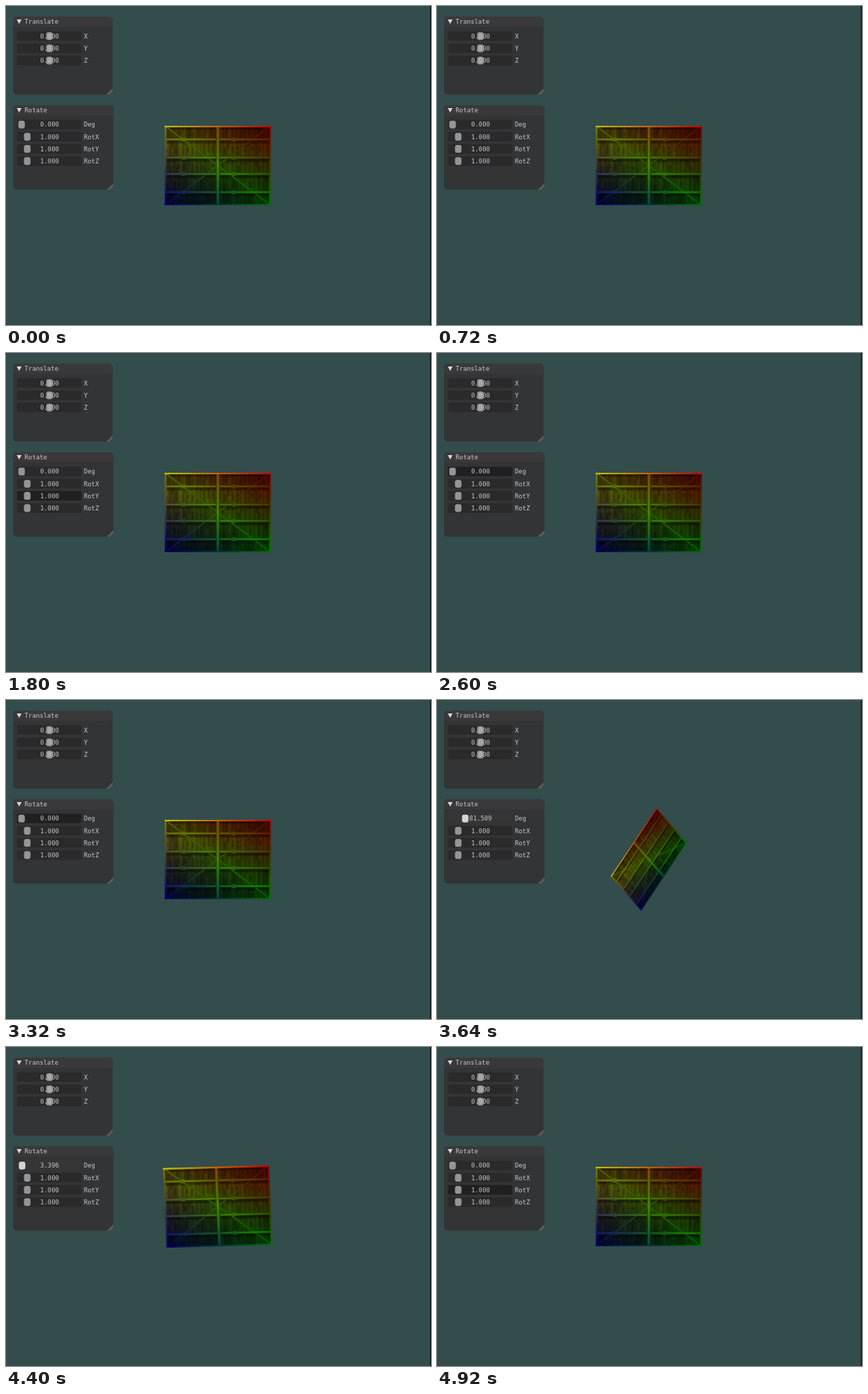
An HTML page with a canvas that plays this animation: 600 by 450 pixels, repeating every 5000 ms.

```html
<!DOCTYPE html>
<html lang="en">
<head>
<meta charset="utf-8">
<title>Translate and rotate</title>
<style>
  html, body { margin: 0; width: 100%; height: 100%; overflow: hidden; background: #334c4c; }
  canvas { display: block; }
</style>
</head>
<body>
<canvas id="stage" width="600" height="450"></canvas>
<script>
const ctx = document.getElementById('stage').getContext('2d');
const LOOP = 5000, TICK = 40;
const DEG_PER_STEP = 360 / 106;

// Slider drag: [time, slider steps]
const DRAG = [
  [3520, 0], [3560, 6], [3600, 15], [3640, 24], [3720, 37], [3800, 42],
  [3880, 36], [3960, 22], [4080, 7], [4200, 4], [4360, 1], [4440, 0]
];

function stepsAt(t) {
  const i = DRAG.findIndex(([time]) => time > t);
  if (i < 1) return 0;
  const [t0, n0] = DRAG[i - 1], [t1, n1] = DRAG[i];
  return Math.round(n0 + (n1 - n0) * (t - t0) / (t1 - t0));
}

const within = (t, from, to) => t >= from && t < to;

function seededRandom(seed) {
  return () => {
    seed = (seed * 16807) % 2147483647;
    return seed / 2147483647;
  };
}

// A square wooden crate face, tinted by its corner colours.
function makeCrate(size) {
  const canvas = document.createElement('canvas');
  canvas.width = canvas.height = size;
  const g = canvas.getContext('2d');
  const random = seededRandom(417);
  const gray = (v, a = 1) => `rgba(${v},${v},${v},${a})`;
  const wood = (v, a = 1) => `rgba(${v},${v * 0.86},${v * 0.62},${a})`;
  const box = (x, y, w, h, color) => {
    g.fillStyle = color;
    g.fillRect(x * size, y * size, w * size, h * size);
  };
  const line = (x0, y0, x1, y1, width, color) => {
    g.strokeStyle = color;
    g.lineWidth = width * size;
    g.beginPath();
    g.moveTo(x0 * size, y0 * size);
    g.lineTo(x1 * size, y1 * size);
    g.stroke();
  };

  // Planks with soft grain, darkening towards the foot
  const beams = [0.174, 0.402, 0.607, 0.835];
  const edges = [0, ...beams, 1];
  const rowLight = [78, 104, 88, 76, 70];
  g.filter = 'blur(1.6px)';
  rowLight.forEach((light, row) => {
    const top = edges[row], height = edges[row + 1] - top;
    box(0, top, 1, height, wood(light));
    for (let x = 0; x < 1; x += 0.042) {
      box(x, top, 0.042, height, wood(light - 14 + Math.floor(random() * 28)));
      box(x, top, 0.008, height, wood(25, 0.45));
      const y = random() * 0.6;
      box(x + random() * 0.03, top + y * height, 0.014, height * (1 - y) * random(), wood(25, 0.5));
    }
    box(0, top, 1, 0.05, gray(10, 0.45));
  });

  // Braces, beams and bolts
  g.filter = 'blur(1px)';
  for (const [y0, y1] of [[0, 1], [1, 0]]) {
    line(0, y0, 1, y1, 0.028, gray(50, 0.5));
    line(0, y0, 1, y1, 0.015, gray(108, 0.85));
  }
  for (const y of beams) {
    box(0, y - 0.016, 1, 0.038, gray(45, 0.8));
    box(0, y - 0.012, 1, 0.022, gray(136));
    for (const x of [0.18, 0.65]) box(x - 0.018, y - 0.024, 0.036, 0.048, gray(110));
  }
  box(0.484, 0, 0.034, 1, gray(45, 0.8));
  box(0.489, 0, 0.023, 1, gray(138));

  // Rim, with studs along the top and bottom
  g.filter = 'none';
  g.strokeStyle = gray(118);
  g.lineWidth = size * 0.034;
  g.strokeRect(0, 0, size, size);
  box(0, 0, 1, 0.022, gray(185));
  for (let x = 0; x < 1; x += 2 / 75) {
    box(x, 0, 0.0133, 0.01, gray(225));
    box(x, 0.99, 0.0133, 0.01, gray(85));
  }

  // Red rises with height; the diagonal runs blue, green, black.
  const tint = document.createElement('canvas');
  tint.width = tint.height = size;
  const c = tint.getContext('2d');
  const wash = (x1, y1, stops) => {
    const gradient = c.createLinearGradient(0, size, x1, y1);
    stops.forEach((color, i) => gradient.addColorStop(i / (stops.length - 1), color));
    c.fillStyle = gradient;
    c.fillRect(0, 0, size, size);
  };
  wash(0, 0, ['#000', '#f00']);
  c.globalCompositeOperation = 'lighter';
  wash(size, 0, ['#00f', '#0f0', '#000']);

  g.globalCompositeOperation = 'multiply';
  g.drawImage(tint, 0, 0);
  return canvas;
}

const crate = makeCrate(300);

// Orthographic view of a turn about the axis (1, 1, 1).
function drawCrate(degrees) {
  const angle = degrees * Math.PI / 180;
  const cos = Math.cos(angle), turn = Math.sin(angle) / Math.sqrt(3);
  const cross = (1 - cos) / 3, diag = cos + cross;
  const halfW = 75, halfH = 56.3;
  ctx.save();
  ctx.transform(halfW * diag, -halfH * (cross + turn), -halfW * (cross - turn), halfH * diag, 299, 225);
  ctx.imageSmoothingQuality = 'high';
  ctx.drawImage(crate, -1, -1, 2, 2);
  ctx.restore();
}

function fillRound(x, y, w, h, r, color) {
  ctx.fillStyle = color;
  ctx.beginPath();
  ctx.roundRect(x, y, w, h, r);
  ctx.fill();
}

function fillTriangle(color, ...points) {
  ctx.fillStyle = color;
  ctx.beginPath();
  for (const [x, y] of points) ctx.lineTo(x, y);
  ctx.fill();
}

function label(text, x, middle, align = 'left') {
  ctx.font = '8.8px "DejaVu Sans Mono", monospace';
  ctx.textAlign = align;
  ctx.fillStyle = '#c8c8c8';
  ctx.fillText(text, x, middle + 3.2);
}

function panel(title, y, w, h) {
  const right = 10 + w, bottom = y + h;
  fillRound(10, y, w, h, 5, '#333436');
  fillRound(10, y, w, 14.5, [5, 5, 0, 0], '#39393b');
  fillTriangle('#d8d8d8', [15.2, y + 4], [22, y + 4], [18.6, y + 10.2]);
  label(title, 26.3, y + 7);
  fillTriangle('#5a5b5c', [right, bottom - 9], [right, bottom - 4], [right - 4, bottom], [right - 9, bottom]);
}

const ROW_COLORS = { idle: '#2a2a2b', hover: '#202021', active: '#363637' };

function slider(name, middle, value, grabX, state = 'idle') {
  fillRound(15.5, middle - 6.8, 91, 13.4, 2, ROW_COLORS[state]);
  fillRound(grabX - 4.6, middle - 5.5, 9.2, 11, 3.2, state === 'active' ? '#d4d4d4' : '#959595');
  label(value.toFixed(3), 61.5, middle, 'center');
  label(name, 110, middle);
}

function draw(t) {
  const degrees = stepsAt(t) * DEG_PER_STEP;
  ctx.fillStyle = '#334c4c';
  ctx.fillRect(0, 0, 600, 450);
  ctx.fillStyle = '#0d1515';
  ctx.fillRect(598.6, 0, 1.4, 450);

  drawCrate(degrees);

  panel('Translate', 15, 140.5, 110);
  ['X', 'Y', 'Z'].forEach((name, i) => slider(name, 42.5 + i * 17.2, 0, 61.3));

  panel('Rotate', 140, 141.5, 119);
  const degState = within(t, 3480, 4560) ? 'active' : within(t, 2400, 3480) ? 'hover' : 'idle';
  const hoverY = within(t, 1720, 2240) || t >= 4800;
  slider('Deg', 167.2, degrees, 22 + degrees * 79 / 360, degState);
  slider('RotX', 184.4, 1, 30);
  slider('RotY', 201.6, 1, 30, hoverY ? 'hover' : 'idle');
  slider('RotZ', 218.8, 1, 30);
}

const start = performance.now();
function frame() {
  const t = (performance.now() - start) % LOOP;
  draw(Math.floor(t / TICK) * TICK);
  requestAnimationFrame(frame);
}
frame();
</script>
</body>
</html>
```
